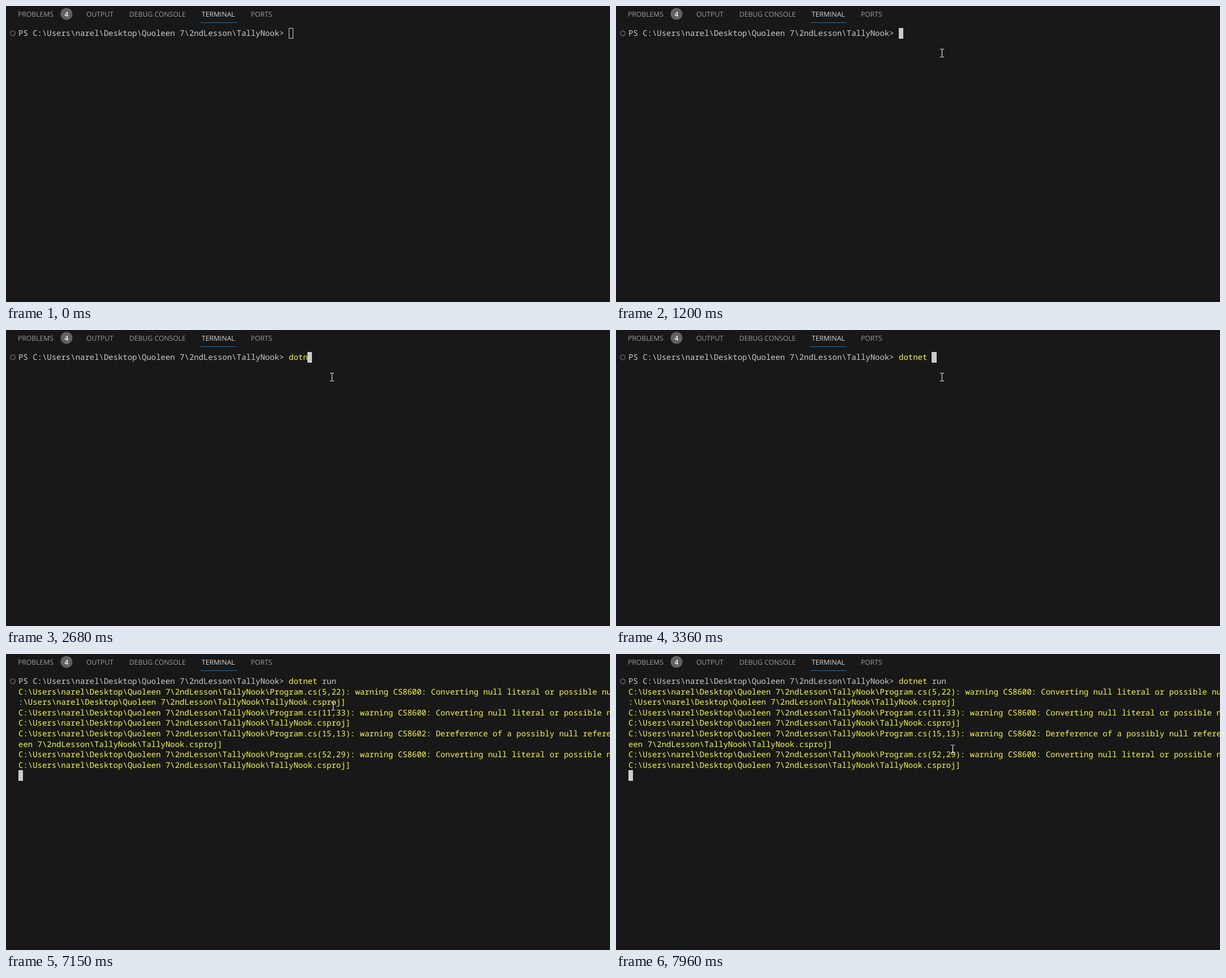
An HTML page with a canvas for the animation above (8000 ms loop, 1068 px wide and 525 px high).

```html
<!DOCTYPE html>
<html lang="en">
<head>
<meta charset="utf-8">
<title>Terminal session</title>
<style>
  html, body { margin: 0; width: 100%; height: 100%; overflow: hidden; background: #181818; }
  canvas { display: block; }
</style>
</head>
<body>
<canvas id="stage" width="1068" height="525"></canvas>
<script>
const ctx = document.getElementById('stage').getContext('2d');
const LOOP = 8000;
const CELL = { x: 22, y: 39.4, w: 8.386, h: 18.6, ascent: 14 };
const GREY = '#cccccc', YELLOW = '#f9f943', GREEN = '#23d18b';
const MONO = '500 13.98px "Noto Sans Mono", monospace';
const SANS = '12.2px "Open Sans", sans-serif';

const path = (...parts) => parts.join('\\');
const APP = 'TallyNook', COURSE = 'Quoleen 7';
const TAIL = path('2ndLesson', APP);
const HOME = path('Users', 'narel', 'Desktop', COURSE, TAIL);
const PROJECT = APP + '.csproj]';
const PROMPT = 'PS ' + path('C:', HOME) + '> ';

const warn = (at, text) => `${path('C:', HOME, 'Program.cs')}(${at}): warning ${text}`;
const NULLABLE = 'CS8600: Converting null literal or possible null value';
const OUTPUT = [
  warn('5,22', NULLABLE),
  path(':', HOME, PROJECT),
  warn('11,33', NULLABLE),
  path('C:', HOME, PROJECT),
  warn('15,13', 'CS8602: Dereference of a possibly null reference.'),
  path(COURSE.slice(4), TAIL, PROJECT),
  warn('52,29', NULLABLE),
  path('C:', HOME, PROJECT)
];

const TABS = [['PROBLEMS', 21], ['OUTPUT', 142], ['DEBUG CONSOLE', 218], ['TERMINAL', 346], ['PORTS', 433]];

// Time at which each character of the command appears
const COMMAND = 'dotnet run';
const KEYS = [2000, 2270, 2470, 2680, 2740, 2870, 3360, 3630, 3910, 4110];
const FOCUS = 1200, ENTER = 4500, PRINTED = 7150;

// Pointer moves: start time, number of steps, from, to, easing power
const MOVES = [
  { t: 70, steps: 12, from: [978, 497], to: [588, 114], pow: 2 },
  { t: 860, steps: 5, from: [584, 105.5], to: [576, 83], pow: 1.5 },
  { t: 7150, steps: 4, from: [578, 92], to: [588, 128], pow: 1 },
  { t: 7750, steps: 4, from: [590, 138], to: [595, 168], pow: 1 }
];
const STEP = 66;

const colX = col => CELL.x + col * CELL.w;
const rowY = row => Math.floor(CELL.y + row * CELL.h);

function cells(text, col, row, color) {
  ctx.font = MONO;
  ctx.fillStyle = color;
  [...text].forEach((ch, i) => ctx.fillText(ch, colX(col + i), rowY(row) + CELL.ascent));
}

function caret(col, row, solid) {
  const x = Math.floor(colX(col)), y = rowY(row);
  const w = Math.floor(colX(col + 1)) - x, h = rowY(row + 1) - y;
  if (solid) {
    ctx.fillStyle = GREY;
    ctx.fillRect(x, y, w, h);
  } else {
    ctx.strokeStyle = GREY;
    ctx.lineWidth = 1;
    ctx.strokeRect(x + 0.5, y + 0.5, w - 1, h - 1);
  }
}

function tabs() {
  ctx.font = SANS;
  for (const [name, x] of TABS) {
    ctx.fillStyle = name === 'TERMINAL' ? '#d8d8d8' : '#9d9d9d';
    ctx.fillText(name, x, 19);
  }
  ctx.fillStyle = '#0078d4';
  ctx.fillRect(344, 29, 64, 1);

  ctx.fillStyle = '#616161';
  ctx.beginPath();
  ctx.arc(107, 14, 10.6, 0, Math.PI * 2);
  ctx.fill();
  ctx.fillStyle = '#f8f8f8';
  ctx.font = '600 ' + SANS;
  ctx.textAlign = 'center';
  ctx.fillText('4', 107, 19);
  ctx.textAlign = 'left';
}

function terminal(t) {
  ctx.strokeStyle = '#525252';
  ctx.lineWidth = 2;
  ctx.beginPath();
  ctx.arc(12, 48.5, 4.2, 0, Math.PI * 2);
  ctx.stroke();

  cells(PROMPT, 0, 0, GREY);
  const typed = KEYS.filter(k => t >= k).length;
  const start = PROMPT.length;
  // The shell colours "do" as a keyword until the word grows
  cells(COMMAND.slice(0, Math.min(typed, 6)), start, 0, typed === 2 ? GREEN : YELLOW);
  cells(COMMAND.slice(6, Math.max(typed, 6)), start + 6, 0, GREY);

  if (t >= PRINTED) {
    OUTPUT.forEach((line, i) => cells(line, 0, i + 1, YELLOW));
    caret(0, OUTPUT.length + 1, true);
  } else if (t >= ENTER) {
    caret(0, 1, true);
  } else {
    caret(start + typed, 0, t >= FOCUS);
  }
}

function pointer(t) {
  const move = MOVES.filter(m => t >= m.t).pop();
  if (!move) return;
  const last = move.steps - 1;
  const step = Math.min(last, Math.floor((t - move.t + 6) / STEP));
  const p = 1 - Math.pow(1 - step / last, move.pow);
  const [x, y] = move.from.map((a, i) => Math.round(a + (move.to[i] - a) * p));
  ctx.fillStyle = '#ffffff';
  ctx.fillRect(x, y - 6, 1, 13);
  for (const edge of [y - 7, y + 7]) {
    ctx.fillRect(x - 3, edge, 3, 1);
    ctx.fillRect(x + 1, edge, 3, 1);
  }
}

function draw(t) {
  ctx.fillStyle = '#181818';
  ctx.fillRect(0, 0, 1068, 525);
  tabs();
  terminal(t);
  pointer(t);
}

ctx.textRendering = 'geometricPrecision';
const begin = performance.now();
function frame() {
  draw((performance.now() - begin) % LOOP);
  requestAnimationFrame(frame);
}
frame();
</script>
</body>
</html>
```
